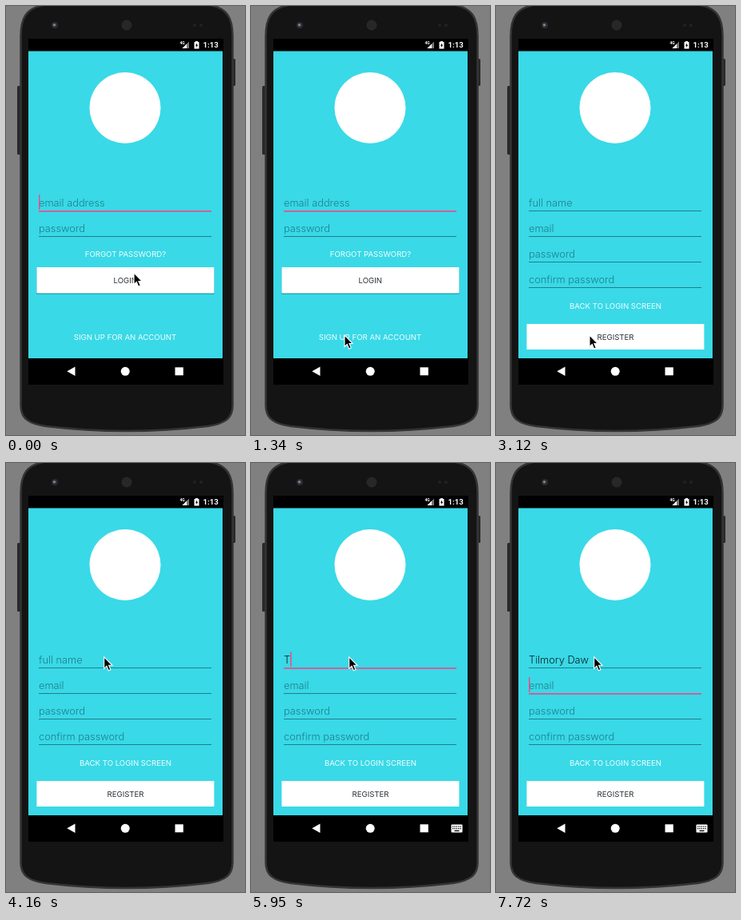
These frames come from a looping animation (299x537 px, 8000 ms). An HTML page:

```html
<!DOCTYPE html>
<html lang="en">
<head>
<meta charset="utf-8">
<title>Sign up flow</title>
<style>
  html, body { margin: 0; width: 100%; height: 100%; overflow: hidden; background: #808080; }
  svg { display: block; width: 100%; height: 100%; }
  text { font-family: Inter, sans-serif; white-space: pre; }
  .field { font-size: 12.8px; font-weight: 300; fill: #1f7f8a; }
  .typed { fill: #0b2226; }
  .caps { font-size: 9.6px; text-anchor: middle; fill: #f2feff; }
  .dark { fill: #2b3238; }
  .status { font: 700 9.6px Roboto, sans-serif; fill: #fff; }
  .tiny { font-size: 5px; }
</style>
</head>
<body>
<svg viewBox="0 0 299 537">
  <defs>
    <pattern id="mesh" width="2" height="2" patternUnits="userSpaceOnUse">
      <rect width="2" height="2" fill="#1d1d1d"/><circle cx="1" cy="1" r=".6" fill="#4a4a4a"/>
    </pattern>
  </defs>

  <!-- Phone -->
  <rect width="299" height="537" fill="#808080"/>
  <rect x="14" y="100" width="6" height="86" rx="1.5" fill="#292929"/>
  <rect x="282" y="66" width="5" height="34" rx="1.5" fill="#292929"/>
  <path d="M18.5 38C18.5 14 26 3 46 -1Q150 -14 256 -1C276 3 283.500 14 283.500 38V500C283.500 516 274 523 252 526Q150 538 50 526C28 523 18.500 516 18.500 500Z"
        fill="#141414" stroke="#343434" stroke-width="2.500"/>
  <circle cx="61" cy="24" r="4" fill="#2b2d33"/>
  <circle cx="60.500" cy="23.700" r="1.800" fill="#7d818b"/>
  <circle cx="151" cy="24" r="6" fill="url(#mesh)" stroke="#303030" stroke-width=".7"/>
  <circle cx="236" cy="24" r="2" fill="#222"/>
  <circle cx="244" cy="24" r="2" fill="#222"/>
  <rect x="28" y="41" width="244" height="433" fill="#000"/>
  <rect x="28" y="56.500" width="243" height="384.500" fill="#39d9e7"/>

  <!-- System bars -->
  <text class="status" x="246.500" y="52.300">1:13</text>
  <text class="status tiny" x="217.500" y="48.300">4G</text>
  <path d="M220.500 53L229 44.500V53Z" fill="#777"/>
  <path d="M220.500 53L226 47.500V53Z" fill="#fff"/>
  <path d="M235.500 45H237V44H240V45H241.500V53.500H235.500Z" fill="#fff"/>
  <path d="M239 46.500L237 49.800H238.300V52L240.200 48.800H239Z" fill="#000"/>
  <path d="M76.300 457.300L86.500 451.600V463Z" fill="#fff"/>
  <circle cx="149.200" cy="457.300" r="5.500" fill="#fff"/>
  <rect x="211.500" y="452.300" width="10.300" height="10" fill="#fff"/>
  <g id="keys">
    <rect x="250.500" y="452.500" width="14" height="10" rx="1" fill="#fff"/>
    <path d="M252 455.200H263M252 457.700H263" stroke="#000" stroke-width="1.300" stroke-dasharray="1.300 1.050"/>
    <path d="M254.500 460.400H260.500" stroke="#000" stroke-width="1.300"/>
  </g>

  <circle cx="149" cy="127.500" r="44.500" fill="#fff"/>

  <g id="login">
    <text class="caps" x="149.500" y="314.200">FORGOT PASSWORD?</text>
    <rect x="38" y="328" width="222.500" height="33" rx="1" fill="#1b8793" opacity=".6"/>
    <rect x="38.400" y="327" width="222" height="32.500" rx="1" fill="#fff"/>
    <text class="caps dark" x="149.300" y="346.800">LOGIN</text>
    <text class="caps" x="149" y="417.600">SIGN UP FOR AN ACCOUNT</text>
  </g>
  <g id="join">
    <text class="caps" x="149.500" y="379.200">BACK TO LOGIN SCREEN</text>
    <rect x="38.400" y="398" width="222" height="32" rx=".5" fill="#fff"/>
    <text class="caps dark" x="149.500" y="417.600">REGISTER</text>
  </g>
  <g id="fields"></g>
  <rect id="caret" width="1.500" height="18.500" fill="#f04a86"/>
  <path id="mouse" d="M0 0V14.500L3.300 11.500L5.600 17L8.200 15.900L5.900 10.500H10.300Z" fill="#000" stroke="#fff" stroke-width="1.100"/>
</svg>
<script>
const LOOP = 8000, JOIN = 3120, FOCUS = 4460, TYPE = 5950, REST = 7140, NEXT = 7720;
const NAME = 'Tilmory Daw', LEFT = 41, ROW = 32;
const $ = id => document.getElementById(id);
const show = (el, on) => el.setAttribute('visibility', on ? 'visible' : 'hidden');
const add = (tag, attrs) => {
  const el = document.createElementNS('http://www.w3.org/2000/svg', tag);
  for (const k in attrs) el.setAttribute(k, attrs[k]);
  return $('fields').appendChild(el);
};

const rows = [0, 1, 2, 3].map(i => ({
  text: add('text', { x: LEFT, y: 250.5 + ROW * i, class: 'field' }),
  line: add('rect', { x: LEFT, y: 256 + ROW * i, width: 216 })
}));
const hints = {
  login: ['email address', 'password'],
  join: ['full name', 'email', 'password', 'confirm password']
};

// time, x, y of the pointer tip
const path = [
  [0, 160, 334], [150, 156, 339], [300, 146, 352], [450, 133, 369], [595, 123, 380],
  [740, 119, 385.5], [890, 118, 394], [1040, 117, 404], [1190, 116.5, 411], [1340, 117, 412],
  [3720, 118, 394], [3870, 121, 338], [4010, 124, 272], [4160, 122.7, 242.8]
];
// times at which the caret flips, starting visible
const flips = [300, 740, 1190, 1640, 2080, 2530, 5210, 5650];

function typedCount(t) {
  if (t < TYPE) return 0;
  const first = Math.min(7, 1 + Math.floor((t - TYPE) / 148.2));
  const last = t < REST ? 0 : Math.min(4, 1 + Math.floor((t - REST) / 146));
  return first + last;
}

function draw(t) {
  const join = t >= JOIN;
  const labels = join ? hints.join : hints.login;
  const typed = NAME.slice(0, typedCount(t));
  const focus = !join ? 0 : t < FOCUS ? -1 : t < NEXT ? 0 : 1;

  show($('login'), !join);
  show($('join'), join);
  show($('keys'), t >= 4610);

  rows.forEach(({ text, line }, i) => {
    const used = i === 0 && typed;
    const active = i === focus;
    text.textContent = used ? typed : labels[i] || '';
    text.setAttribute('class', used ? 'field typed' : 'field');
    show(line, i < labels.length);
    line.setAttribute('height', active ? 1.8 : 1);
    line.setAttribute('fill', active ? '#e5528f' : '#217f89');
  });

  const lit = flips.filter(f => f <= t).length % 2 === 0;
  const end = focus === 0 && typed ? rows[0].text.getComputedTextLength() : 0;
  show($('caret'), focus >= 0 && lit);
  $('caret').setAttribute('x', LEFT + end);
  $('caret').setAttribute('y', 236.3 + ROW * Math.max(focus, 0));

  const [, x, y] = path.filter(p => p[0] <= t).pop();
  $('mouse').setAttribute('transform', `translate(${x} ${y})`);
}

const start = performance.now();
function tick() {
  draw((performance.now() - start) % LOOP);
  requestAnimationFrame(tick);
}
tick();
</script>
</body>
</html>
```
